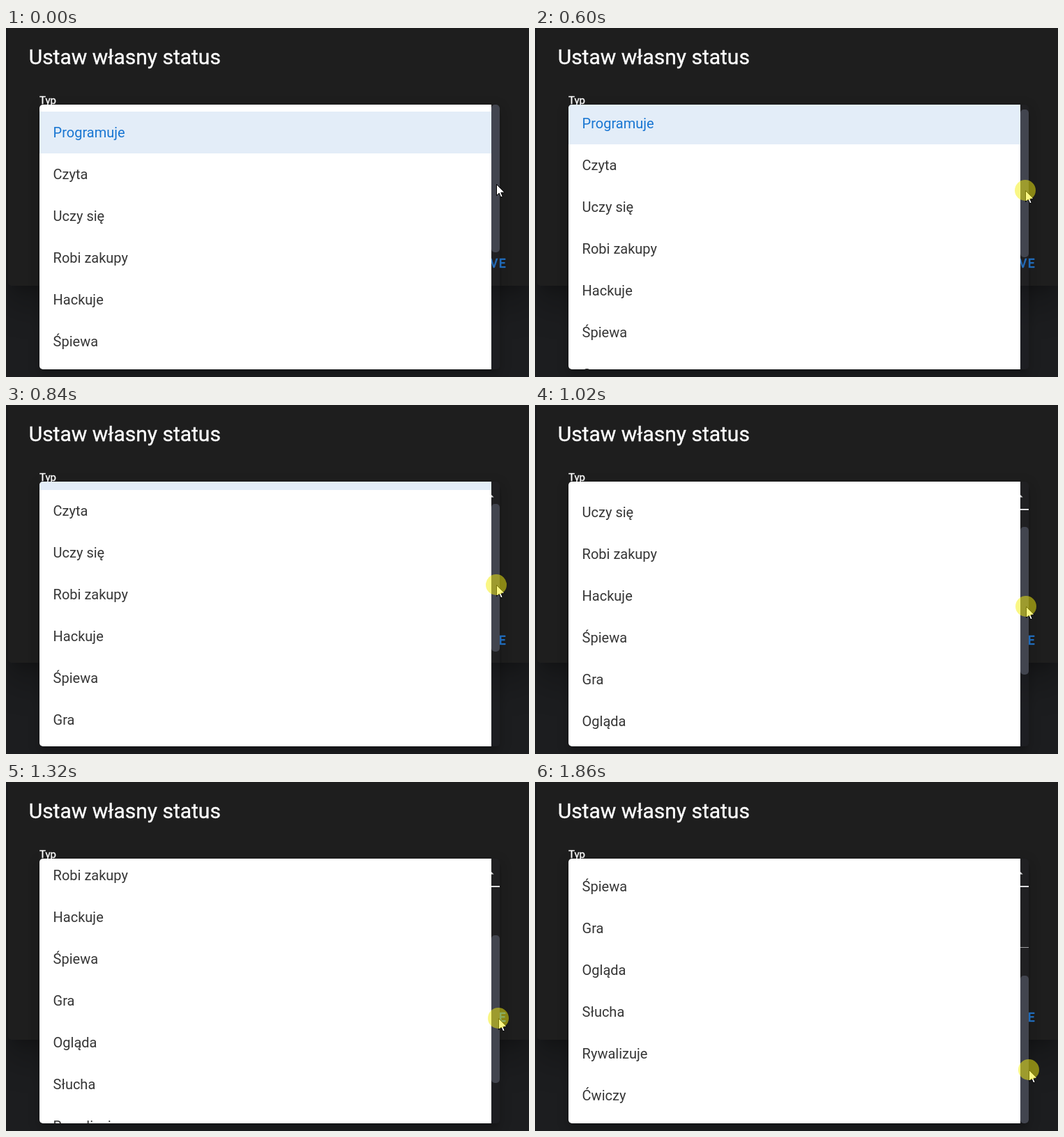
Animation, 750 px wide and 501 px high, one loop 1.92 s. Source, as an HTML page:

```html
<!DOCTYPE html>
<html lang="pl">
<head>
<meta charset="utf-8">
<title>Status</title>
<style>
  html, body { margin: 0; width: 100%; height: 100%; overflow: hidden; background: #1c1d1f; }
  .stage { position: fixed; inset: 0; overflow: hidden; overflow: clip; }
  .card, .menu, svg { position: absolute; }
  .card {
    left: 3px; right: 0; top: 0; height: 370px; border-radius: 0 0 0 5px; background: #1e1e1e;
    box-shadow: 0 14px 19px -9px rgba(0,0,0,.2), 0 30px 48px 4px rgba(0,0,0,.14), 0 11px 58px 10px rgba(0,0,0,.12);
  }
  .menu {
    left: 48px; top: 110px; width: 660px; height: 380px; border-radius: 5px;
    box-shadow: 0 6px 6px -4px rgba(0,0,0,.16), 0 10px 13px 1px rgba(0,0,0,.1), 0 4px 18px 3px rgba(0,0,0,.08);
  }
  svg { left: 0; top: 0; width: 100%; height: 100%; display: block; font-family: Roboto, sans-serif; }
  .light { fill: #fff; stroke: #fff; stroke-width: .35px; }
  .action { fill: #2478d0; stroke: #2478d0; stroke-width: .3px; font-weight: 500; letter-spacing: 1.5px; }
</style>
</head>
<body>
<div class="stage">
<div class="card"></div>
<svg viewBox="0 0 750 501">
  <text class="light" x="32.7" y="52" font-size="30">Ustaw własny status</text>
  <text class="light" x="48" y="109" font-size="15">Typ</text>
  <path d="M687 132.5l6.3-6.3 6.3 6.3z" fill="#fff"/>
  <rect x="48" y="149" width="660" height="2" fill="#fff"/>
  <rect x="48" y="237" width="660" height="1" fill="#b4b4b4"/>
  <text class="action" x="718.2" y="344" font-size="17.5" text-anchor="end">SAVE</text>
</svg>
<div class="menu"></div>
<svg viewBox="0 0 750 501">
  <clipPath id="box"><rect x="48" y="110" width="660" height="380" rx="5"/></clipPath>
  <clipPath id="view"><rect x="48" y="110" width="648" height="380"/></clipPath>
  <g clip-path="url(#box)">
    <rect x="696" y="110" width="12" height="380" fill="#2a2a36" fill-opacity=".15"/>
    <g clip-path="url(#view)">
      <rect x="48" y="110" width="648" height="380" fill="#fff"/>
      <g id="list" font-size="20" fill="#363636">
        <rect x="48" y="120" width="648" height="60" fill="#e3edf8"/>
      </g>
    </g>
    <rect id="thumb" x="696" y="110" width="12" height="212" rx="5" fill="#42454f"/>
  </g>
  <g id="pointer">
    <path d="M.5 .5V16.6L4.2 13.1 6.7 18.9 9.2 17.8 6.8 12.2H12z" fill="#fff" stroke="#000"/>
    <circle id="press" r="15" fill="#f6f010" fill-opacity=".51"/>
  </g>
</svg>
</div>
<script>
const LOOP = 1920, STEP = 60, PRESS = 180, MAX_SCROLL = 300, TRAVEL = 168;
const labels = ['Programuje', 'Czyta', 'Uczy się', 'Robi zakupy', 'Hackuje', 'Śpiewa',
  'Gra', 'Ogląda', 'Słucha', 'Rywalizuje', 'Ćwiczy'];
const $ = id => document.getElementById(id);
const list = $('list'), thumb = $('thumb'), pointer = $('pointer'), press = $('press');

labels.forEach((label, i) => {
  const text = document.createElementNS('http://www.w3.org/2000/svg', 'text');
  text.setAttribute('x', 67.6);
  text.setAttribute('y', 157 + 60 * i);
  if (!i) text.setAttribute('fill', '#1976d2');
  text.textContent = label;
  list.append(text);
});

// Monotone cubic curve through [time, value] points
function curve(pts) {
  const last = pts.length - 1;
  const slope = i => (pts[i + 1][1] - pts[i][1]) / (pts[i + 1][0] - pts[i][0]);
  const tangent = i => {
    if (i === 0 || i === last) return 0;
    const a = slope(i - 1), b = slope(i);
    return a * b > 0 ? 2 * a * b / (a + b) : 0;
  };
  return t => {
    if (t <= pts[0][0]) return pts[0][1];
    if (t >= pts[last][0]) return pts[last][1];
    const i = pts.findIndex(p => p[0] > t) - 1;
    const [t0, v0] = pts[i], [t1, v1] = pts[i + 1];
    const d = t1 - t0, u = (t - t0) / d, w = 1 - u;
    return v0 * w * w * (1 + 2 * u) + v1 * u * u * (3 - 2 * u)
      + d * u * w * (w * tangent(i) - u * tangent(i + 1));
  };
}

const scrollAt = curve([[420, 0], [480, 3], [720, 28], [1020, 116], [1320, 196], [1560, 291], [1620, MAX_SCROLL]]);
const xAt = curve([[720, 703], [1020, 704], [1320, 706], [1560, 707], [1860, 708]]);
const yAt = curve([[420, 224], [480, 227], [720, 242], [1020, 289], [1320, 339], [1560, 387], [1860, 413]]);

function draw(ms) {
  const t = Math.floor(ms % LOOP / STEP) * STEP;
  const scroll = Math.round(scrollAt(t));
  list.setAttribute('transform', `translate(0 ${-scroll})`);
  thumb.setAttribute('y', 110 + Math.round(scroll / MAX_SCROLL * TRAVEL));
  pointer.setAttribute('transform', `translate(${Math.round(xAt(t))} ${Math.round(yAt(t))})`);
  press.setAttribute('visibility', t >= PRESS ? 'visible' : 'hidden');
}

const start = performance.now();
function tick() {
  draw(performance.now() - start);
  requestAnimationFrame(tick);
}
draw(0);
requestAnimationFrame(tick);
</script>
</body>
</html>
```
